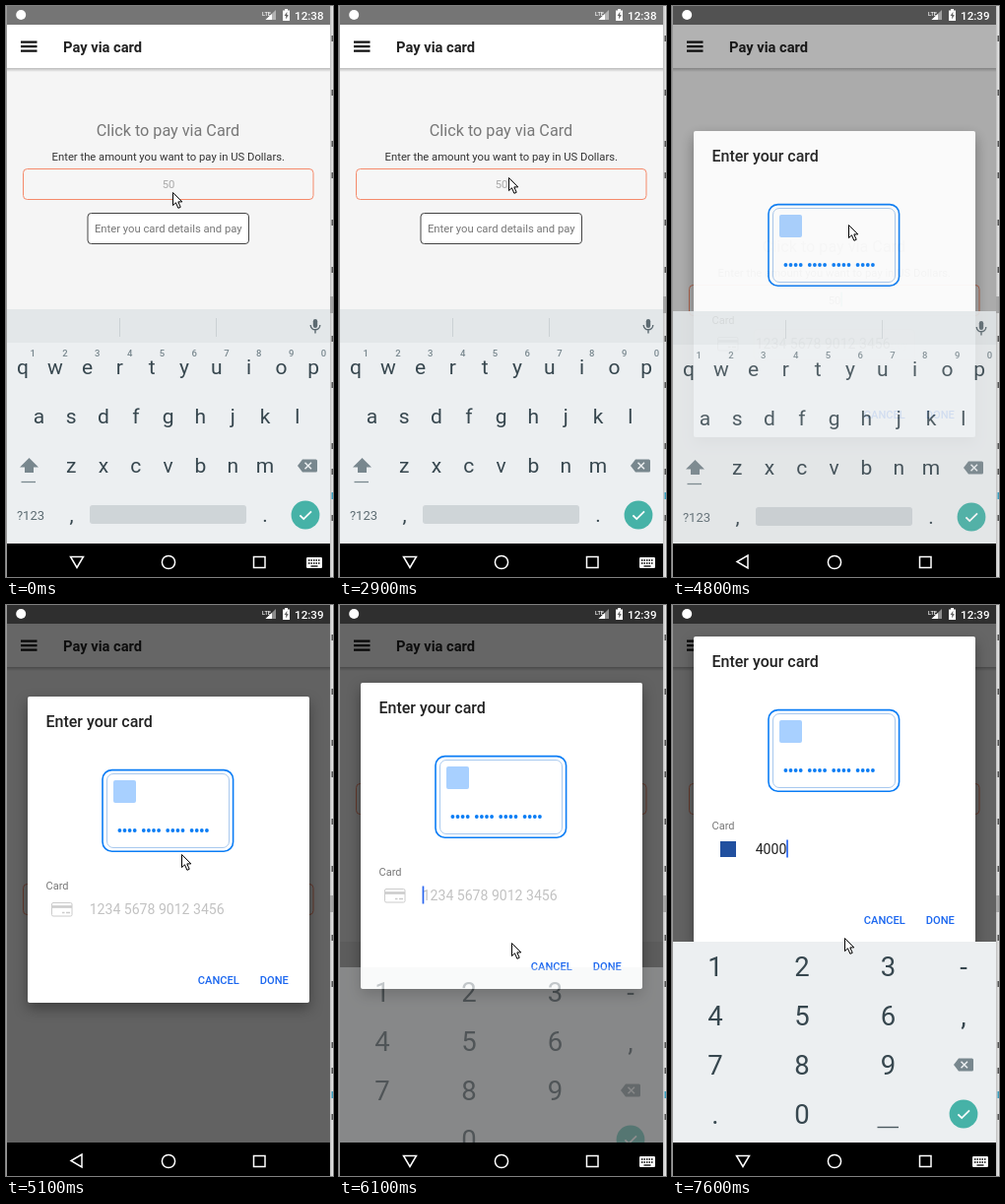
An HTML page that plays this animation: 332x580 px, repeating every 8 s.

```html
<!DOCTYPE html>
<html lang="en">
<head>
<meta charset="utf-8">
<title>Pay via card</title>
<style>
html, body { margin: 0; width: 332px; height: 580px; overflow: hidden; background: #fff; }
svg { display: block; }
text { font-family: Roboto, sans-serif; white-space: pre; }
.mid { text-anchor: middle; }
.med { font-weight: 500; }
</style>
</head>
<body>
<svg id="stage" width="332" height="580" viewBox="0 0 332 580">
  <defs>
    <linearGradient id="edge"><stop offset="0" stop-color="#bdbdbd"/><stop offset="1" stop-color="#ececec"/></linearGradient>
    <linearGradient id="drop" x2="0" y2="1"><stop offset="0" stop-color="#000" stop-opacity=".24"/><stop offset="1" stop-color="#000" stop-opacity="0"/></linearGradient>
    <g id="erase">
      <path d="M-10 0L-5 -6.5H8.5Q10 -6.5 10 -5V5Q10 6.5 8.5 6.5H-5Z" fill="#78878e"/>
      <path d="M-2.5 -3.2L4 3.2M4 -3.2L-2.5 3.2" stroke="#eceff1" stroke-width="1.5"/>
    </g>
    <g id="check">
      <circle r="14.4" fill="#46b2a7"/>
      <path d="M-5.6 .3L-1.8 4.1L6 -3.7" fill="none" stroke="#fff" stroke-width="1.8"/>
    </g>
  </defs>

  <rect width="332" height="580" fill="#f5f5f5"/>
  <g id="content">
    <text class="mid" x="164.5" y="132" font-size="16.2" fill="#777">Click to pay via Card</text>
    <text class="mid" x="164.8" y="157" font-size="11.25" fill="#333">Enter the amount you want to pay in US Dollars.</text>
    <rect x="17.5" y="165.5" width="294.5" height="31" rx="4" fill="#f6f6f6" stroke="#f58a6b"/>
    <text id="amount" class="mid" x="165" y="185" font-size="11.25"></text>
    <rect id="amountCaret" y="172.5" width="1.6" height="15" fill="#26a69a"/>
    <rect x="83" y="210.5" width="163.5" height="31" rx="3.5" fill="#fff" stroke="#444"/>
    <text class="mid" x="164.8" y="230" font-size="11.25" fill="#777">Enter you card details and pay</text>
  </g>
  <rect width="332" height="19" fill="#757575"/>
  <rect y="19" width="332" height="44" fill="#fff"/>
  <rect y="63" width="332" height="4" fill="url(#drop)"/>
  <path d="M15 36.7H31.5M15 41.2H31.5M15 45.7H31.5" stroke="#111" stroke-width="2.3"/>
  <text x="58" y="47" font-size="14.7" font-weight="700" fill="#212121">Pay via card</text>
  <rect id="shade" y="342" width="332" height="204" fill="#000" opacity=".06"/>
  <rect id="dim" width="332" height="546"/>

  <g id="status" fill="#fff">
    <circle cx="15.2" cy="9" r="5"/>
    <text class="med" x="260" y="9.5" font-size="5.6">LTE</text>
    <path d="M274 4V14H263.5Z" opacity=".45"/>
    <path d="M270 8V14H263.5Z"/>
    <path d="M281 4.5H283V3H286V4.5H288V15H281Z"/>
    <path d="M285.4 5.8L282.6 10H284.2V13.4L286.8 9H285.2Z" fill="#666"/>
    <text id="clock" class="med" x="322.5" y="14" font-size="11.6" text-anchor="end"></text>
  </g>

  <g id="dialog">
    <rect x="22" y="93" width="286" height="311" rx="2" fill="#fff" style="filter:drop-shadow(0 6px 7px rgba(0,0,0,.35))"/>
    <text class="med" x="40.5" y="123.5" font-size="16" fill="#212121">Enter your card</text>
    <rect x="98" y="167.6" width="132.6" height="82.6" rx="9.5" fill="#fff" stroke="#0b7df5" stroke-width="1.6"/>
    <rect x="102.5" y="171.5" width="124" height="75" rx="6.5" fill="none" stroke="#a9c9ee"/>
    <rect x="109" y="178" width="23" height="23" rx="2" fill="#a8d0ff"/>
    <g id="dots" fill="#0b7df5"></g>
    <text x="40.5" y="289" font-size="11" fill="#777">Card</text>
    <g id="blankCard" fill="none" stroke="#ccc">
      <rect x="46.5" y="302.5" width="20.5" height="13.5" rx="1.5"/>
      <path d="M46.5 306.5H67" stroke-width="2.6"/>
      <path d="M57 312.5H59.5M61 312.5H65" stroke-width="1.6"/>
    </g>
    <rect id="brand" x="49" y="301" width="16" height="16" fill="#21509f"/>
    <text id="number" x="84.7" y="314" font-size="14.07"></text>
    <rect id="cardCaret" y="299.5" width="1.7" height="18" fill="#2a66f0"/>
    <g class="med" font-size="11.1" fill="#1a66ef">
      <text x="194.8" y="385">CANCEL</text><text x="257.8" y="385">DONE</text>
    </g>
  </g>

  <g id="letters">
    <rect y="308" width="332" height="240" fill="#eceff1"/>
    <rect y="308" width="332" height="34" fill="#e3e7e9"/>
    <path d="M115.5 317V336M213.5 317V336" stroke="#cbd1d4"/>
    <g transform="translate(314 325)" fill="none" stroke="#5c6a71" stroke-width="1.4">
      <rect x="-2.2" y="-7" width="4.4" height="9" rx="2.2" fill="#5c6a71" stroke="none"/>
      <path d="M-4.8 -1A4.8 4.8 0 0 0 4.8 -1M0 4V7.5"/>
    </g>
    <path d="M23.5 459L33 468.5H28V474H19V468.5H14Z" fill="#78878e"/>
    <path d="M15.5 483.5H30" stroke="#78878e" stroke-width="1.3"/>
    <use href="#erase" x="306" y="467"/>
    <text class="mid" x="25" y="521.5" font-size="13" fill="#5c6b72">?123</text>
    <rect x="85" y="507" width="159" height="19" rx="3" fill="#cfd5d8"/>
    <use href="#check" x="304" y="517"/>
  </g>
  <g id="digits">
    <rect y="342" width="332" height="240" fill="#eceff1"/>
    <use href="#erase" x="296" y="467"/>
    <use href="#check" x="296" y="517"/>
    <path d="M208.5 530.5H230" stroke="#4a5960" stroke-width="1.4"/>
  </g>

  <rect y="546" width="332" height="34"/>
  <g fill="none" stroke="#fff" stroke-width="1.5">
    <path id="back" d="M-6.5 -5H6.5L0 6Z"/>
    <circle cx="165" cy="565" r="6.6"/>
    <rect x="251.5" y="559.5" width="11.5" height="11"/>
  </g>
  <g id="imeIcon">
    <rect x="305" y="560" width="16" height="11" rx="1.2" fill="#fff"/>
    <path d="M307 563H319M307 566H319" stroke="#000" stroke-width="1.5" stroke-dasharray="1.5 1"/>
    <path d="M309.5 569H316.5" stroke="#000" stroke-width="1.3"/>
  </g>

  <rect width="1" height="580" fill="#999"/>
  <rect x="329" width="3" height="580" fill="url(#edge)"/>
  <g id="sliver"></g>
  <path id="mouse" d="M.5 .5V13.6L3.5 10.8L5.9 16.3L8.2 15.3L5.8 9.9H9.8Z" fill="#fff" stroke="#000"/>
</svg>
<script>
const el = {};
document.querySelectorAll('[id]').forEach(n => el[n.id] = n);

function add(parent, tag, attrs, text) {
  const n = document.createElementNS('http://www.w3.org/2000/svg', tag);
  for (const k in attrs) n.setAttribute(k, attrs[k]);
  if (text) n.textContent = text;
  parent.append(n);
}
function key(parent, x, y, size, label, fill = '#37474f') {
  add(parent, 'text', { class: 'mid', x, y, 'font-size': size, fill }, label);
}

// keyboards
[['qwertyuiop', 17], ['asdfghjkl', 33.4], ['zxcvbnm', 66.2]].forEach(([row, x0], r) =>
  [...row].forEach((c, i) => key(el.letters, x0 + i * 32.8, 373.5 + r * 50, 21, c)));
[...'1234567890'].forEach((c, i) =>
  add(el.letters, 'text', { class: 'mid med', x: 27.2 + i * 32.8, y: 356, 'font-size': 9.5, fill: '#78878e' }, c));
key(el.letters, 66.5, 523.5, 21, ',');
key(el.letters, 263, 523.5, 21, '.');
['123-', '456,', '789', '.0'].forEach((row, r) =>
  [...row].forEach((c, i) => key(el.digits, [44, 132, 219.5, 296][i], 376.5 + r * 50, 27.5, c)));

for (let i = 0; i < 16; i++)
  add(el.dots, 'circle', { cx: 115.4 + Math.floor(i / 4) * 24.4 + (i % 4) * 5.1, cy: 229, r: 1.9 });

// slice of the window behind
[33, 88, 140, 172, 220, 268, 338, 385, 447, 473, 520].forEach(y =>
  add(el.sliver, 'rect', { x: 330.5, y: y - 3, width: 1.5, height: 6, fill: '#555' }));
add(el.sliver, 'rect', { x: 329, y: 295, width: 3, height: 17, fill: '#a5a5a5' });
add(el.sliver, 'rect', { x: 330.5, y: 494, width: 1.5, height: 7, fill: '#3a9fc0' });

// linear interpolation through [time, value] points
function track(points, t) {
  if (t <= points[0][0]) return points[0][1];
  for (let i = 1; i < points.length; i++) {
    const [t0, v0] = points[i - 1], [t1, v1] = points[i];
    if (t <= t1) return v0 + (v1 - v0) * (t - t0) / (t1 - t0);
  }
  return points[points.length - 1][1];
}
const mouseX = [[200, 169], [500, 177], [1800, 177], [1900, 174], [2300, 172], [4000, 172], [4300, 178],
  [4400, 178], [4500, 179], [5000, 179], [5400, 175]];
const mouseY = [[200, 189], [500, 189], [1800, 189], [1900, 194], [2300, 174], [4000, 174], [4300, 221],
  [4400, 221], [4500, 222], [5000, 222], [5400, 344], [6000, 344], [6400, 338]];
const dimA = [[4600, 0], [4700, .12], [4800, .3], [4900, .6]];
const dialogA = [[4600, 0], [4700, .45], [4800, .95], [4900, 1]];
const dialogY = [[4700, 58], [4800, 34], [4900, 0], [6000, 0], [6100, -14], [6200, -38], [6300, -55], [6400, -61]];
const lettersA = [[4700, 1], [4800, .87], [4900, 0]];
const lettersY = [[4700, 0], [4800, 2], [4900, 8]];
const digitsA = [[6000, 0], [6100, .3], [6200, .7], [6300, .95], [6400, 1]];
const digitsY = [[6000, 40], [6200, 12], [6300, 3], [6400, 0]];

const within = (t, a, b) => t >= a && t < b;
const show = (n, on) => n.setAttribute('visibility', on ? 'visible' : 'hidden');
const move = (n, x, y) => n.setAttribute('transform', `translate(${x} ${y})`);
const fade = (n, a) => n.setAttribute('opacity', a);

function draw(t) {
  const typed = t < 3200 ? '' : t < 3500 ? '5' : '50';
  el.amount.textContent = typed || '50';
  el.amount.setAttribute('fill', typed ? '#222' : '#aaa');
  el.amountCaret.setAttribute('x', typed ? 165 + typed.length * 3.16 : 158.2);
  show(el.amountCaret, within(t, 500, 1000) || within(t, 1500, 2000) || within(t, 2500, 2900) ||
    within(t, 3200, 4000) || within(t, 4500, 4900));
  el.clock.textContent = t < 3200 ? '12:38' : '12:39';

  move(el.content, 0, t < 4800 ? 0 : t < 6100 ? 118 : 16);
  show(el.shade, within(t, 6000, 6300));
  fade(el.dim, track(dimA, t));
  fade(el.dialog, track(dialogA, t));
  move(el.dialog, 0, track(dialogY, t));
  fade(el.letters, track(lettersA, t));
  move(el.letters, 0, track(lettersY, t));
  fade(el.digits, track(digitsA, t));
  move(el.digits, 0, track(digitsY, t));

  const count = [7000, 7200, 7500, 7600].filter(k => t >= k).length;
  el.number.textContent = count ? '4000'.slice(0, count) : '1234 5678 9012 3456';
  el.number.setAttribute('fill', count ? '#212121' : '#c2c2c2');
  el.cardCaret.setAttribute('x', 84.6 + count * 7.9);
  show(el.cardCaret, within(t, 5900, 6400) || t >= 6900);
  show(el.brand, count === 4);
  show(el.blankCard, count < 4);

  const closed = within(t, 4700, 5900);
  el.back.setAttribute('transform', `translate(72 564.5) rotate(${closed ? 90 : 0})`);
  show(el.imeIcon, !closed);
  move(el.mouse, Math.round(track(mouseX, t)), Math.round(track(mouseY, t)));
}

const start = performance.now();
function tick() {
  const t = (performance.now() - start) % 8000;
  draw(Math.floor(t / 100) * 100);
  requestAnimationFrame(tick);
}
tick();
</script>
</body>
</html>
```
